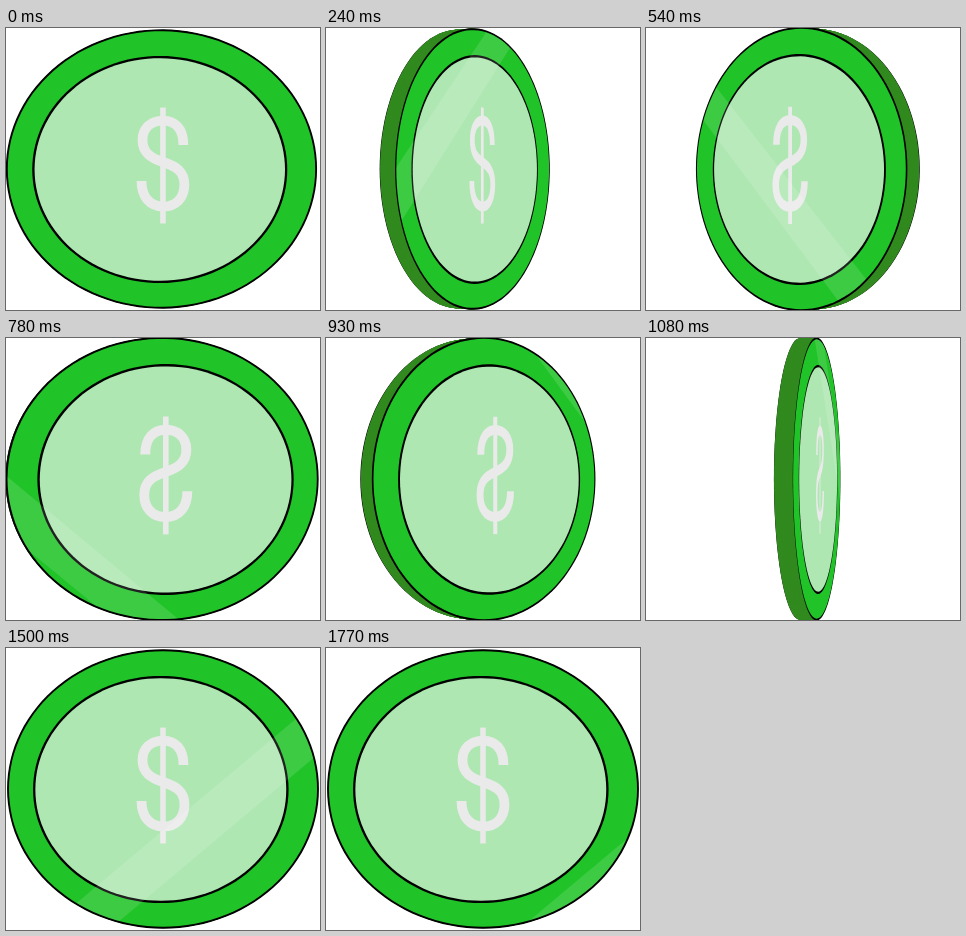
An HTML page with a canvas for the animation above (1800 ms loop, 314 by 282 pixels).

```html
<!DOCTYPE html>
<html>
<head>
<meta charset="utf-8">
<title>Spinning coin</title>
<style>
html, body { margin: 0; width: 100%; height: 100%; overflow: hidden; background: #fff; }
canvas { display: block; }
</style>
</head>
<body>
<canvas id="stage" width="314" height="282"></canvas>
<script>
const ctx = document.getElementById('stage').getContext('2d');
const LOOP = 1800, STEP = 30, SWEEP = 900;
const CX = 157, CY = 141, FOCAL = 1070;
const FRONT = -0.8, BACK = -17.2;
const RX = 155.1, RY = 138.8;
const SLOPE = 0.84, BAND = 54;
const dollar = new Path2D(
  'M20.5-24C20.5-40 12.5-48.5 0-48.5C-12-48.5-20.5-41-20.5-29C-20.5-16-12-11 0-7' +
  'C14-2.5 21.5 3 21.5 15.5C21.5 29 13 37.5.5 37.5C-13 37.5-21.5 28-21.5 12');

let cos, sin;

// Coin coordinates to stage coordinates, turned about the vertical axis
function project(u, v, z) {
  const s = FOCAL / (FOCAL + u * sin - z * cos);
  return [CX + (u * cos + z * sin) * s, CY + v * s];
}

function trace(points, z) {
  ctx.beginPath();
  for (const [u, v] of points) ctx.lineTo(...project(u, v, z));
  ctx.closePath();
}

function traceOval(z, rx, ry, u = 0, v = 0) {
  const points = [];
  for (let i = 0; i < 120; i++) {
    const a = i * Math.PI / 60;
    points.push([u + rx * Math.cos(a), v + ry * Math.sin(a)]);
  }
  trace(points, z);
}

function disc(color, ...oval) {
  traceOval(...oval);
  ctx.fillStyle = color;
  ctx.fill();
}

function outlined(color, line, z, rx, ry, u, v) {
  const h = line / 2;
  disc('#000', z, rx + h, ry + h, u, v);
  disc(color, z, rx - h, ry - h, u, v);
}

function drawDollar(z) {
  const s = FOCAL / (FOCAL - z * cos);
  const [x, y] = project(0, 0, z);
  ctx.save();
  ctx.transform(s * cos - z * sin * sin * s * s / FOCAL, 0, 0, s, x, y);
  ctx.strokeStyle = ctx.fillStyle = '#eaeaea';
  ctx.lineWidth = 9.8;
  ctx.stroke(dollar);
  ctx.fillRect(-2.8, -61.5, 5.6, 116);
  ctx.restore();
}

function drawShine(z, from) {
  const edge = (u, c) => [u, c - SLOPE * u];
  ctx.save();
  traceOval(z, RX - 0.9, RY - 0.9);
  ctx.clip();
  trace([edge(-200, from), edge(200, from), edge(200, from + BAND), edge(-200, from + BAND)], z);
  ctx.fillStyle = 'rgba(255,255,255,.13)';
  ctx.fill();
  ctx.restore();
}

function draw(t) {
  const angle = Math.min(360, 3.8 + 0.2377 * t) * Math.PI / 180;
  cos = Math.cos(angle);
  sin = Math.sin(angle);
  const [near, far] = cos > 0 ? [FRONT, BACK] : [BACK, FRONT];

  ctx.clearRect(0, 0, 314, 282);
  disc('#000', far, RX + 0.9, RY + 0.5);
  for (let i = 0; i < 34; i++) disc('#318a1f', far + (near - far) * i / 34, RX + 0.2, RY + 0.5);
  outlined('#20c328', 1.9, near, RX, RY);
  outlined('#aee7b1', 2.3, near, 126.7, 112.5, -2.2, 0.5);
  drawDollar(near);
  drawShine(near, -246 + 0.479 * (t % SWEEP));
}

const start = performance.now();
function tick() {
  const t = (performance.now() - start) % LOOP;
  draw(Math.floor(t / STEP) * STEP);
  requestAnimationFrame(tick);
}
tick();
</script>
</body>
</html>
```
